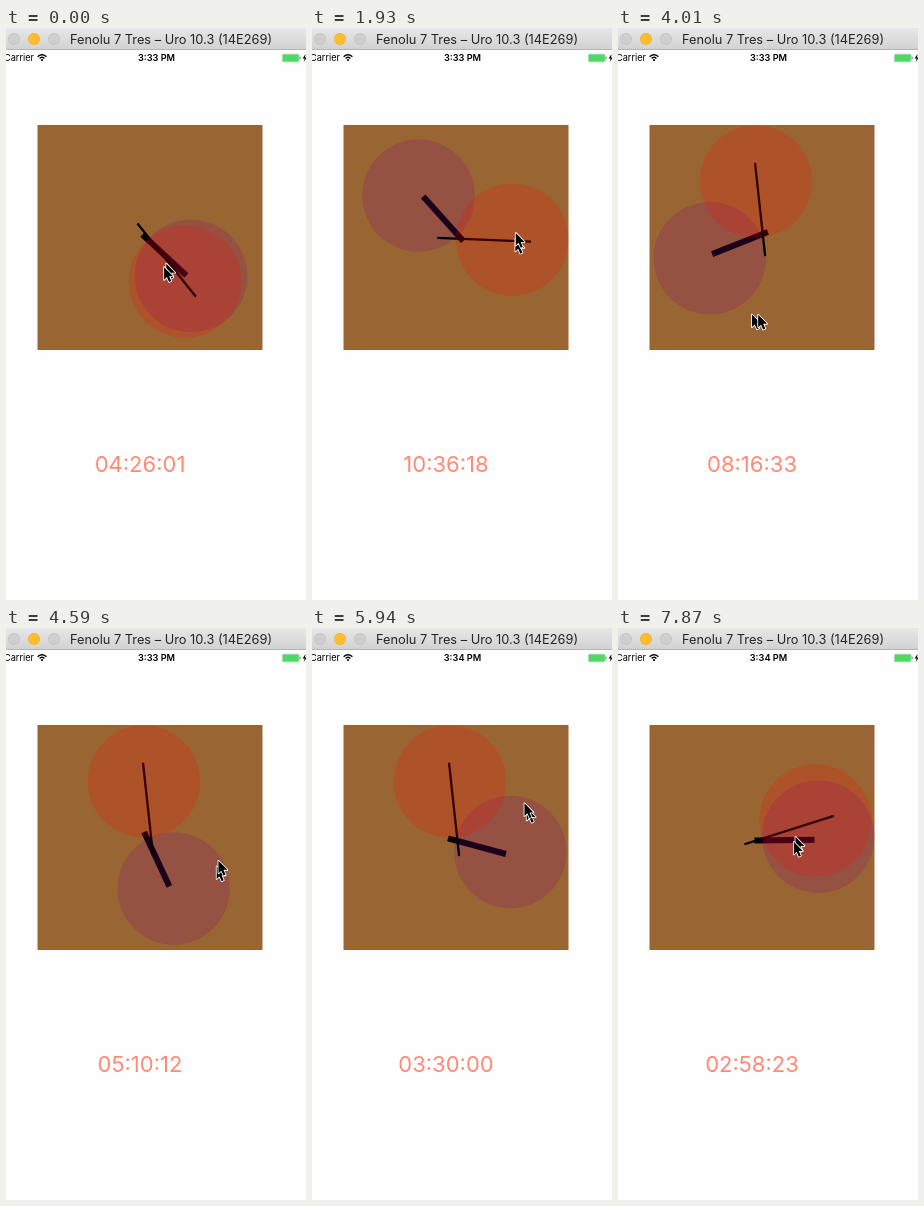
Animation, 300 px wide and 572 px high, one loop 8000 ms. Source, as an HTML page with a canvas:

```html
<!DOCTYPE html>
<html lang="en">
<head>
<meta charset="utf-8">
<title>Draggable clock</title>
<style>
html, body { margin: 0; width: 100%; height: 100%; overflow: hidden; background: #fefefe; }
canvas { display: block; width: 300px; height: 572px; }
</style>
</head>
<body>
<canvas id="stage"></canvas>
<script>
const W = 300, H = 572, LOOP = 8000;
const FIRST = 130, TICK = 148.65;   // the picture advances in even ticks
const CX = 144, CY = 209.5, FACE = 225, R = FACE / 4;
const FONT = 'Inter, Roboto, sans-serif';
const TRAIL = 0.25;                 // lag of the second pointer, in ticks

// Each drag is a steady sweep between turning points: [tick, degrees].
const hourTurns = [
  [0, 133.0083], [6, 285.3417], [7, 318.15], [24, 318.15], [31, 155.1],
  [33, 103], [36, 223.5], [40, 105], [42, 89.1917]
];
const minuteTurns = [[0, 141.4], [11, 141.4], [17, -6.2], [42, -6.2], [48, 254.4], [53, 432.4]];

// The pointer circles the clock centre: [tick, degrees, radius].
const pointerTurns = [
  [0, 153.8, 32], [6, 312.7, 80], [8, 318, 78], [11, 490, 55], [17, 354, 70],
  [20, 313.8, 84], [31, 108, 72], [35, 200, 75], [39, 78, 77], [40, 62.8, 77],
  [42, -6, 70], [48, 280, 62], [53, 456, 32]
];

const canvas = document.getElementById('stage');
const ctx = canvas.getContext('2d');
const ratio = window.devicePixelRatio || 1;
canvas.width = W * ratio;
canvas.height = H * ratio;

function at(turns, k) {
  const i = turns.findIndex(turn => turn[0] > k);
  if (i < 0) return turns[turns.length - 1].slice(1);
  const b = Math.max(1, i), from = turns[b - 1], to = turns[b];
  const p = (k - from[0]) / (to[0] - from[0]);
  return from.slice(1).map((v, n) => v + (to[n + 1] - v) * p);
}

function onDial(angle, radius) {
  const a = angle * Math.PI / 180;
  return [CX + radius * Math.sin(a), CY - radius * Math.cos(a)];
}

function disc(x, y, r, fill) {
  ctx.fillStyle = fill;
  ctx.beginPath();
  ctx.arc(x, y, r, 0, 2 * Math.PI);
  ctx.fill();
}

function poly(points) {
  ctx.beginPath();
  points.forEach(([x, y]) => ctx.lineTo(x, y));
  ctx.closePath();
}

function label(text, x, y, font, fill, align = 'center') {
  ctx.font = font + ' ' + FONT;
  ctx.fillStyle = fill;
  ctx.textAlign = align;
  ctx.fillText(text, x, y);
}

function drawTitleBar() {
  const shade = ctx.createLinearGradient(0, 0, 0, 22);
  shade.addColorStop(0, '#e8e7e8');
  shade.addColorStop(1, '#d2d1d2');
  ctx.fillStyle = shade;
  ctx.fillRect(0, 0, W, 22);
  ctx.fillStyle = '#b4b3b4';
  ctx.fillRect(0, 21, W, 1);
  ['#cfcecf', '#fdbd2f', '#cfcecf'].forEach((fill, i) => {
    disc(8 + 20 * i, 11, 6, i === 1 ? '#eeb02a' : '#c0bfc0');
    disc(8 + 20 * i, 11, 5.5, fill);
  });
  label('Fenolu 7 Tres – Uro 10.3 (14E269)', 165, 16, '12.8px', '#262526');
}

function drawStatusBar(k) {
  label('Carrier', 28, 33, '9.2px', '#000', 'right');
  label(k < 36 ? '3:33 PM' : '3:34 PM', 150.5, 33, '600 9.2px', '#000');

  ctx.strokeStyle = '#000';
  ctx.lineWidth = 1.4;
  [3.2, 5.8].forEach(r => {
    ctx.beginPath();
    ctx.arc(36, 32.6, r, -Math.PI * 0.77, -Math.PI * 0.23);
    ctx.stroke();
  });
  disc(36, 32, 1.1, '#000');

  ctx.strokeStyle = '#b0b0b0';
  ctx.lineWidth = 0.5;
  ctx.beginPath();
  ctx.roundRect(276.3, 26.1, 16.8, 7.8, 1.5);
  ctx.stroke();
  ctx.fillStyle = '#4cd964';
  ctx.fillRect(276.6, 26.4, 16.2, 7.2);
  ctx.fillStyle = '#777';
  ctx.fillRect(293.6, 28.6, 1, 2.8);
  ctx.fillStyle = '#000';
  poly([[299.5, 26], [296.6, 30.4], [298.7, 30.4], [297.6, 34], [301, 29.4], [299, 29.4]]);
  ctx.fill();
}

function drawHand(angle, tail, length, width, handleFill) {
  ctx.save();
  ctx.translate(CX, CY);
  ctx.rotate((angle - 90) * Math.PI / 180);
  ctx.fillStyle = '#000';
  ctx.fillRect(-tail, 0, tail + length, width);
  ctx.restore();
  disc(...onDial(angle, R), R, handleFill);
}

function drawClock(hour, minute) {
  ctx.fillStyle = '#996633';
  ctx.fillRect(CX - FACE / 2, CY - FACE / 2, FACE, FACE);
  drawHand(hour, 7.5, 52.5, 6, 'rgba(128, 0, 128, 0.2)');
  drawHand(minute, 18.75, 75, 2.25, 'rgba(255, 0, 0, 0.2)');
}

function timeText(angle) {
  const s = Math.round(angle * 120);
  return [s / 3600, s / 60 % 60, s % 60]
    .map(v => String(Math.floor(v)).padStart(2, '0')).join(':');
}

function drawPointer(k) {
  const [x, y] = onDial(...at(pointerTurns, k));
  ctx.save();
  ctx.translate(x, y + 1);
  ctx.scale(0.84, 0.84);
  poly([[0, 0], [0, 15], [3.4, 11.8], [5.9, 17.6], [8.4, 16.5], [5.9, 10.8], [10.6, 10.8]]);
  ctx.lineJoin = 'round';
  ctx.strokeStyle = '#fff';
  ctx.lineWidth = 2;
  ctx.stroke();
  ctx.fillStyle = '#000';
  ctx.fill();
  ctx.restore();
}

function draw(t) {
  const k = Math.max(0, Math.floor((t - FIRST) / TICK) + 1);
  const [hour] = at(hourTurns, k);
  const [minute] = at(minuteTurns, k);

  ctx.setTransform(ratio, 0, 0, ratio, 0, 0);
  ctx.fillStyle = '#fefefe';
  ctx.fillRect(0, 0, W, H);
  drawTitleBar();
  drawStatusBar(k);
  drawClock(hour, minute);
  label(timeText(hour), 134, 444, '22px', '#ff8a78');
  drawPointer(k - TRAIL);
  drawPointer(k);
}

const start = performance.now();
function loop() {
  draw((performance.now() - start) % LOOP);
  requestAnimationFrame(loop);
}
loop();
</script>
</body>
</html>
```
